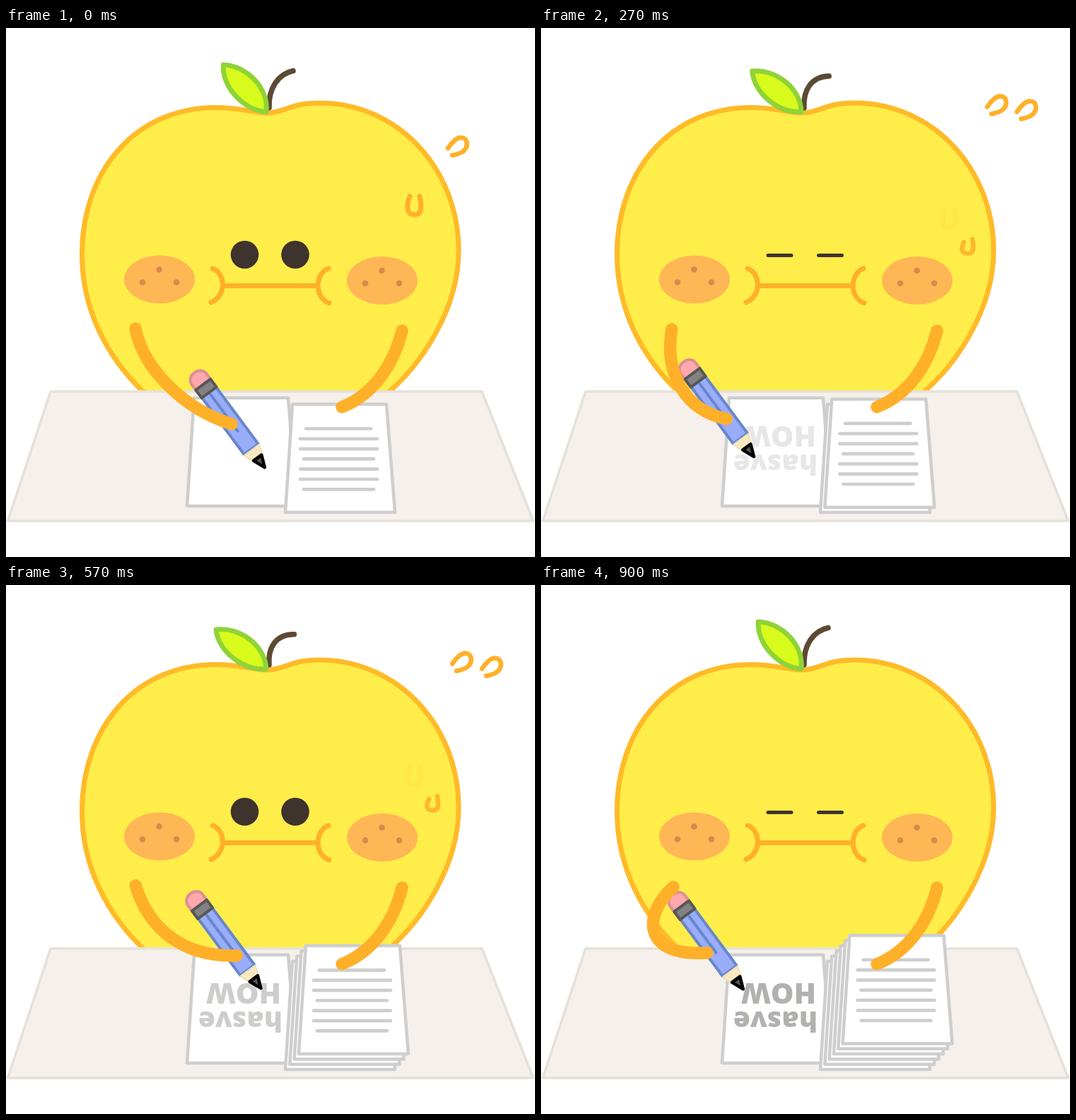
Animation, 748 px wide and 748 px high, one loop 930 ms. Source, as an HTML page with a canvas:

```html
<!DOCTYPE html>
<html lang="en">
<head>
<meta charset="utf-8">
<title>Busy apple</title>
<style>
  html, body { margin: 0; width: 100%; height: 100%; overflow: hidden; background: #fff; }
  canvas { display: block; width: 100vw; height: 100vh; }
</style>
</head>
<body>
<canvas id="stage" width="748" height="748"></canvas>
<script>
const ctx = document.getElementById('stage').getContext('2d');
const STEP = 30, STEPS = 31;
const ORANGE = '#ffb029', PAPER_LINE = '#cecece';

const mix = (a, b, k) => a + (b - a) * k;
const mixAll = (a, b, k) => a.map((v, i) => mix(v, b[i], k));

// Poses every ten steps: shoulder, two control points, hand.
const ARM = [
  [183, 425, 195, 485, 255, 540, 319, 560],
  [185, 426, 172, 490, 198, 540, 256, 552],
  [183, 425, 205, 484, 254, 525, 334, 521],
  [187, 427, 140, 470, 148, 527, 235, 520]
];
const PENCIL_TIP = [[367, 623], [295, 606], [369, 568], [287, 573]];

function pose(keys, step) {
  const i = Math.min(2, Math.floor(step / 10));
  return mixAll(keys[i], keys[i + 1], step / 10 - i);
}

function paint(path, fill, stroke, width) {
  const p = typeof path === 'string' ? new Path2D(path) : path;
  if (fill) { ctx.fillStyle = fill; ctx.fill(p); }
  if (stroke) { ctx.strokeStyle = stroke; ctx.lineWidth = width; ctx.stroke(p); }
}

function dot(x, y, rx, ry, fill) {
  const p = new Path2D();
  p.ellipse(x, y, rx, ry, 0, 0, Math.PI * 2);
  paint(p, fill);
}

function at(x, y, angle, draw) {
  ctx.save();
  ctx.translate(x, y);
  ctx.rotate(angle);
  draw();
  ctx.restore();
}

function curve([x, y, ...rest], color, width) {
  paint(`M${x},${y}C${rest}`, null, color, width);
}

function drawBody() {
  paint('M200,520C140,465 107.5,395 107.5,320C107.5,205 180,112.5 297,112.5' +
    'C330,112.5 350,120 370,120C395,120 400,106 443,106' +
    'C555,106 640,200 640,315C640,395 590,475 535,520Z', '#ffed4a', '#ffba28', 7);
}

function drawTop(step) {
  const sway = 1 - Math.abs(step - 15) / 15;
  curve(mixAll([372, 113, 371, 85, 385, 65, 406, 60.5],
               [372, 113, 370, 90, 380, 71, 408, 73], sway), '#5d4a34', 7.5);
  at(368, 118.5, (47.6 - 13.1 * sway) * Math.PI / 180, () =>
    paint('M0,0C-22,-25 -66,-24 -90,0C-68,23 -22,22 0,0Z', '#d8fb1c', '#8fd337', 7));
}

function drawFace(step) {
  const blink = (step >= 8 && step <= 10) || step >= 28;
  for (const x of [337.5, 409]) {
    if (blink) paint(`M${x - 16.5},321.5h33`, null, '#3e332d', 5);
    else dot(x, 320.5, 19.8, 19.8, '#3e332d');
  }
  for (const [x, y] of [[217, 355.5], [532, 357]]) {
    dot(x, y, 50, 34, '#ffb655');
    for (const [dx, dy] of [[-0.5, -14], [-24, 4], [24, 4]]) dot(x + dx, y + dy, 4.3, 4.3, '#dc884c');
  }
  paint('M307,364.5H440M292,340C310,346 313,378 290,388' +
    'M456,340C438,346 434,380 457,389', null, ORANGE, 7);
}

function drawSweat(step) {
  if (step === STEPS - 1) return;
  const p = step % 10;
  ctx.globalAlpha = 1 - p / 10;
  at(577, 250 + 2.1 * p, 0, () =>
    paint('M-6,-12C-12,4 -10,14 1,14C11,14 11,4 8,-12', null, ORANGE, 7));
  ctx.globalAlpha = p / 10;
  at(603, 289 + 2.2 * p, 0, () =>
    paint('M-5,-6C-10,5 -8,10 1,10C9,10 9,2 7,-10', null, ORANGE, 6.5));
  ctx.globalAlpha = 1;

  const flying = p <= 5 ? [[638 + 1.8 * p, 167 - 1.4 * p]] : [];
  if (p >= 5) {
    const q = p - 5;
    flying.push([636 + 2 * q, 118.5 - 2.5 * q], [679 + 1.75 * q, 122.5 - 1.75 * q]);
  }
  for (const [x, y] of flying) {
    at(x, y, 0, () =>
      paint('M-13,3C-7,-6 -2,-11 4,-12C14,-13 17,-2 10,6C5,11 -2,12 -7,13', null, ORANGE, 6.5));
  }
}

function drawSheet(x, y, lined) {
  at(x, y, 0, () => {
    paint('M0,0H133L145,153H-10Z', '#fff', PAPER_LINE, 4.5);
    if (!lined) return;
    const ends = [[19, 111], [11, 120], [11, 120], [16, 115], [11, 120], [11, 120], [16, 115]];
    ends.forEach(([a, b], i) => paint(`M${a},${34.5 + i * 14.3}H${b}`, null, PAPER_LINE, 4.7));
  });
}

function drawWords(step) {
  ctx.fillStyle = '#b1b1af';
  ctx.globalAlpha = step / 30;
  const write = (text, x, y, size) => at(x, y, Math.PI, () => {
    ctx.font = `800 ${size}px "Open Sans", sans-serif`;
    ctx.fillText(text, 0, 0);
  });
  write('HOW', 389, 563, 41);
  write('hasve', 391, 603, 39);
  ctx.globalAlpha = 1;
}

function drawPencil([x, y]) {
  at(x, y, 53.4 * Math.PI / 180, () => {
    paint('M-148,-13H-157C-173,-13 -173,13 -157,13H-148Z', '#ffa8ad', '#db9193', 4);
    paint('M-134,-12.5H-34V12.5H-134Z', '#99adfb', '#6687cb', 4);
    paint('M-130,0H-66', null, '#6687cb', 4);
    paint('M-148,-13H-134V13H-148Z', '#828282', '#575757', 4);
    paint('M-33,-13L-18,-8V8L-33,13Z', '#f9e9c3', '#efdfb6', 2);
    paint('M-19,-7L-2,0L-19,7Z', '#555', '#000', 4.5);
  });
}

function draw(step) {
  ctx.fillStyle = '#fff';
  ctx.fillRect(0, 0, 748, 748);
  ctx.lineCap = ctx.lineJoin = 'round';
  drawBody();
  drawTop(step);
  drawFace(step);
  drawSweat(step);
  paint('M63,514H673L745.5,697H2.5Z', '#f5f0eb', '#e5e1d9', 3.5);
  drawSheet(266, 523, false);
  drawWords(step);
  const sheets = Math.min(6, Math.floor(step / 5) + 1);
  for (let i = 0; i < sheets; i++) drawSheet(405 + 6.3 * i, 532 - 7.3 * i, true);
  drawPencil(pose(PENCIL_TIP, step));
  curve(pose(ARM, step), ORANGE, 17.5);
  curve([560, 428, 548, 476, 520, 518, 475, 536], ORANGE, 17.5);
}

const start = performance.now();
function tick() {
  const elapsed = Math.max(0, performance.now() - start);
  draw(Math.floor(elapsed / STEP) % STEPS);
  requestAnimationFrame(tick);
}
tick();
</script>
</body>
</html>
```
